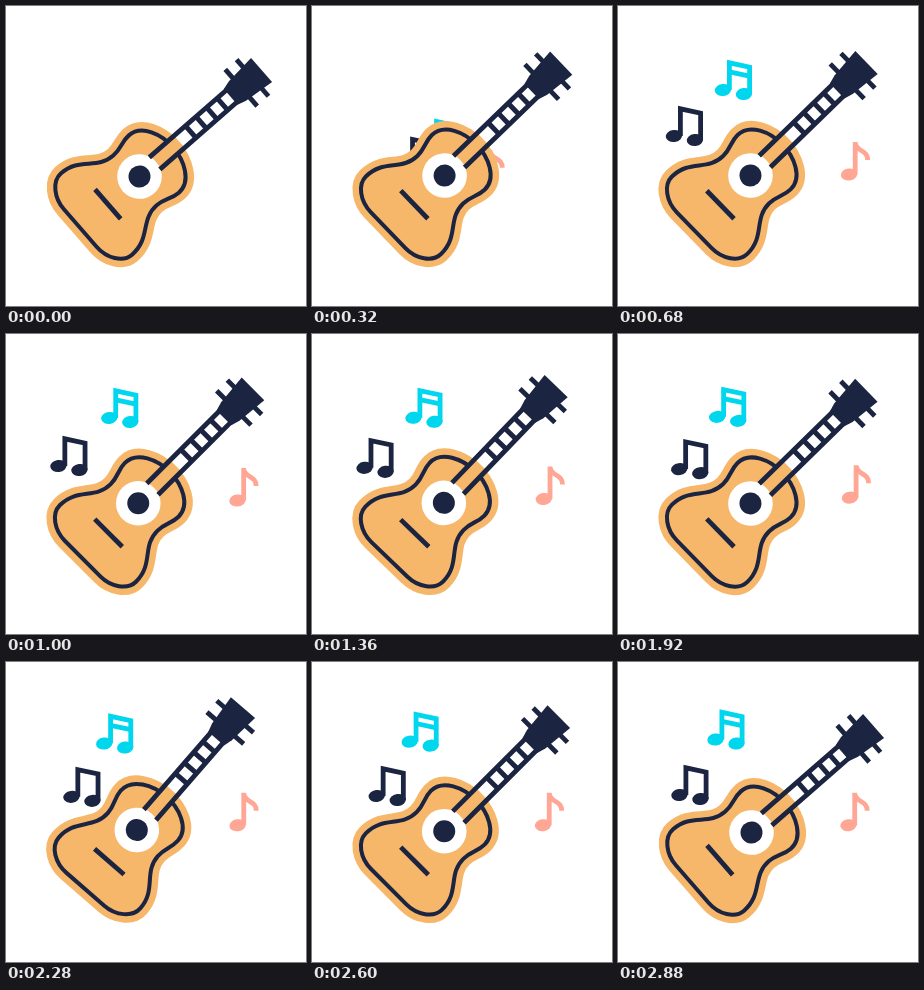
Recreate the animation shown at these times as an HTML page. Size 300 px wide and 300 px high, loop 2.92 s.

```html
<!DOCTYPE html>
<html lang="en">
<head>
<meta charset="utf-8">
<title>Guitar and notes</title>
<style>
  html, body { margin: 0; width: 100%; height: 100%; overflow: hidden; background: #fff; }
  svg { display: block; width: 100%; height: 100%; }
  .navy { --ink: #1b2440; }
  .cyan { --ink: #00d7ee; }
  .pink { --ink: #ffa695; }
  .ink { fill: var(--ink); }
  .line { fill: none; stroke: var(--ink); stroke-width: 4; }
  .bold { stroke-width: 4.8; }
  .wood { fill: #f6b76b; stroke: #f6b76b; }
</style>
</head>
<body>
<svg viewBox="0 0 300 300">
  <defs>
    <path id="body" d="M0-44.5C17-44.5 38-36 38-19C38-9 33-5 33 6C33 28 54 32 54 57C54 69 40 78.5 25 78.5H-25C-40 78.5-54 69-54 57C-54 32-33 28-33 6C-33-5-38-9-38-19C-38-36-17-44.5 0-44.5Z"/>
    <ellipse id="head" rx="8.2" ry="6" transform="rotate(-8)"/>
    <g id="pair">
      <use href="#head" class="ink"/>
      <use href="#head" class="ink" x="21" y="4"/>
      <path class="line bold" d="M6.4 0V-27.2L26.6-22.9V4"/>
    </g>
  </defs>

  <!-- Each note's origin is the centre of its left head. -->
  <g id="cyan" class="cyan">
    <use href="#pair"/>
    <path class="line bold" d="M6.4-18.2L26.6-13.9"/>
  </g>
  <g id="navy" class="navy"><use href="#pair"/></g>
  <g id="pink" class="pink">
    <use href="#head" class="ink"/>
    <path class="line bold" d="M6.2 0V-32.5M6.3-31C8.5-22 18.7-25 18.7-14.5"/>
  </g>

  <!-- The guitar is drawn upright, with its sound hole at the origin. -->
  <g id="guitar" class="navy">
    <g transform="translate(133.5 170.5) rotate(48.9)">
      <use href="#body" class="wood" stroke-width="17"/>
      <use href="#body" class="line"/>
      <circle r="22.3" fill="#fff"/>
      <circle r="11" class="ink"/>
      <path class="line bold" d="M-19.5 42H19.5"/>
      <g stroke-width="16">
        <path stroke="#fff" d="M0-50V-124"/>
        <path class="wood" d="M0-22V-53"/>
        <path stroke="var(--ink)" stroke-dasharray="5 9" d="M0-65.5V-113"/>
      </g>
      <path class="line bold" d="M-8-20V-124M8-20V-124M-24.3-135H24.3M-24.3-150H24.3"/>
      <path class="ink" d="M-16-162H16L13-130L10.4-121H-10.4L-13-130Z"/>
    </g>
  </g>
</svg>
<script>
const LOOP = 2920, STEP = 40;
const FLY_START = 60, FLY_END = 680, DRIFT_END = 2880;
const PIVOT = '114 188.5';
const { sin, cos, PI } = Math;

const progress = (t, from, to) => Math.min(1, Math.max(0, (t - from) / (to - from)));
const mix = (a, b, k) => a + (b - a) * k;
const ease = p => (1 - cos(PI * p)) / 2;

// Turning points of the swing: time and angle.
const swing = [[0, 0], [500, 4], [800, 2.7], [1240, 5.3], [1810, 2.6], [2310, 8], [2880, 0]];

// Notes fly from behind the body to their home, then drift with u from 0 to 1.
const notes = {
  navy: {
    from: [117, 179], home: [56, 130],
    drift: u => [5.5 * (u - sin(2 * PI * u)), 3 * u + 3.5 * sin(PI * u)]
  },
  cyan: {
    from: [126, 178], home: [105, 84],
    drift: u => [-7.5 * sin(PI * u / 2), -6.5 * u ** 3]
  },
  pink: {
    from: [136, 181], home: [231, 168.5],
    drift: u => [1.2 * sin(PI * u) - u / 2, -5.3 * (1 - (1 - u) ** 3)]
  }
};

function swingAngle(t) {
  const next = Math.max(1, swing.findIndex(([time]) => time >= t));
  const [[t0, a0], [t1, a1]] = t >= DRIFT_END ? swing.slice(-2) : swing.slice(next - 1, next + 1);
  return mix(a0, a1, ease(progress(t, t0, t1)));
}

function notePosition({ from, home, drift }, t) {
  const flown = ease(progress(t, FLY_START, FLY_END));
  const offset = drift(progress(t, FLY_END, DRIFT_END));
  return home.map((h, i) => mix(from[i], h, flown) + offset[i]);
}

const setTransform = (id, value) => document.getElementById(id).setAttribute('transform', value);

function draw(t) {
  setTransform('guitar', `rotate(${-swingAngle(t)} ${PIVOT})`);
  for (const id in notes) setTransform(id, `translate(${notePosition(notes[id], t)})`);
}

const start = performance.now();
function tick() {
  const t = (performance.now() - start) % LOOP;
  draw(Math.floor(t / STEP) * STEP);
  requestAnimationFrame(tick);
}
draw(0);
requestAnimationFrame(tick);
</script>
</body>
</html>
```
